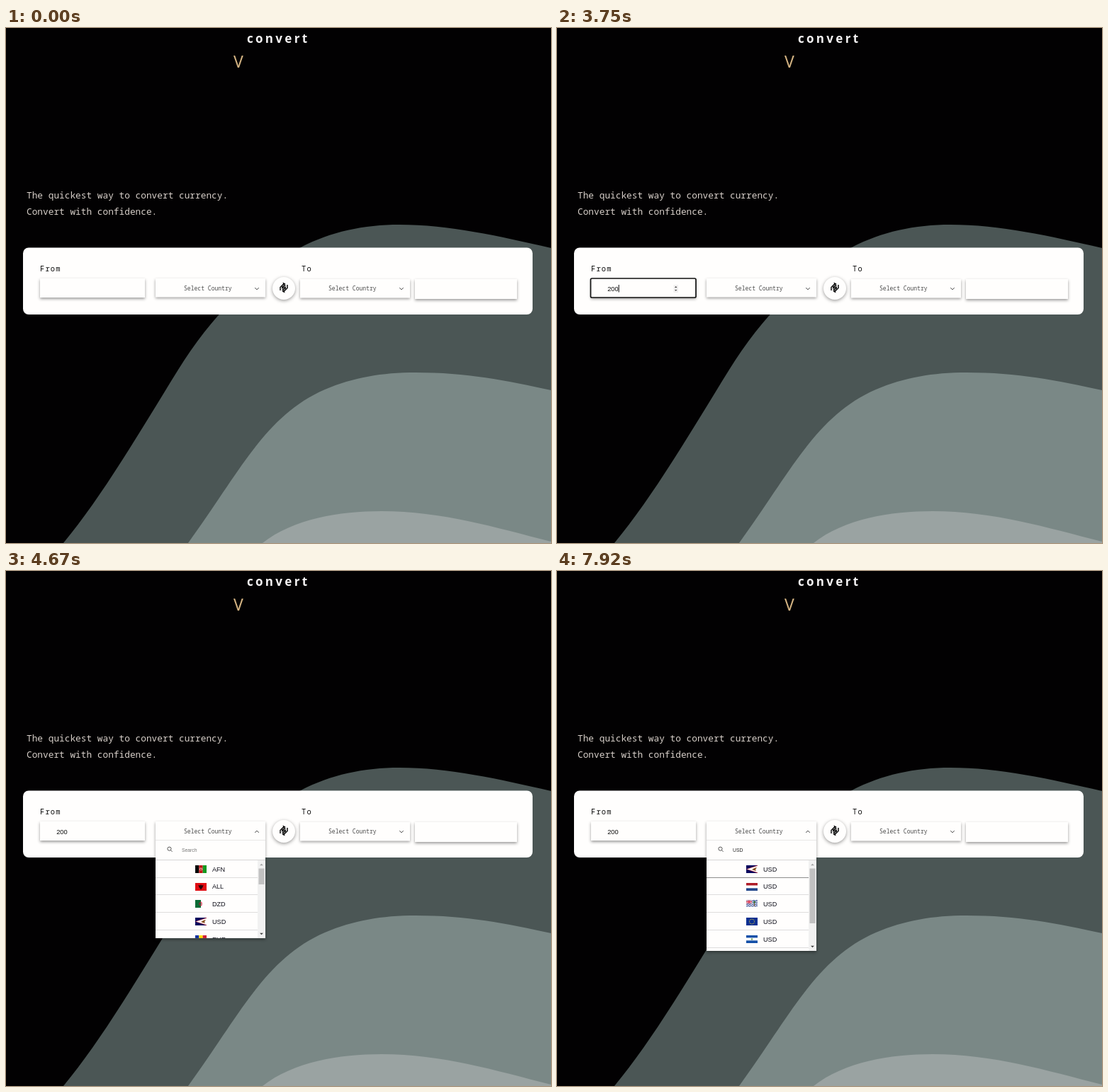
Write an HTML page with a canvas that moves like this. It is 769x728 px and loops after 8 s.

```html
<!DOCTYPE html>
<html lang="en">
<head>
<meta charset="utf-8">
<title>convert</title>
<style>
  html, body { margin: 0; width: 100%; height: 100%; overflow: hidden; background: #020102; }
  canvas { display: block; }
</style>
</head>
<body>
<canvas id="stage" width="769" height="728"></canvas>
<script>
const ctx = document.getElementById('stage').getContext('2d');
const LOOP = 8000;
const MONO = '"Noto Sans Mono", "DejaVu Sans Mono", monospace';
const SANS = '"Liberation Sans", Arial, sans-serif';
const HEAD = '"Noto Sans", "Open Sans", sans-serif';
const INK = '#0c0c0c', PAPER = '#fffefd';
const ROW = 24.8, LIST_TOP = 409, LIST_HEIGHT = 128;

function text(str, x, y, font, color, spacing = 0) {
  ctx.font = font;
  ctx.letterSpacing = spacing + 'px';
  ctx.fillStyle = color;
  ctx.fillText(str, x, y);
  const width = ctx.measureText(str).width;
  ctx.letterSpacing = '0px';
  return width;
}

function rect(x, y, w, h, color) {
  ctx.fillStyle = color;
  ctx.fillRect(x, y, w, h);
}

function disc(x, y, r, color) {
  ctx.fillStyle = color;
  ctx.beginPath();
  ctx.arc(x, y, r, 0, Math.PI * 2);
  ctx.fill();
}

function poly(points, color) {
  ctx.fillStyle = color;
  ctx.beginPath();
  points.forEach(([x, y]) => ctx.lineTo(x, y));
  ctx.fill();
}

function line(points, color, width) {
  ctx.strokeStyle = color;
  ctx.lineWidth = width;
  ctx.beginPath();
  points.forEach(([x, y]) => ctx.lineTo(x, y));
  ctx.stroke();
}

function raised(draw, blur = 4) {
  ctx.save();
  ctx.shadowColor = 'rgba(0,0,0,.4)';
  ctx.shadowBlur = blur;
  ctx.shadowOffsetY = 1.5;
  draw();
  ctx.restore();
}

const box = (x, y, w, h) => raised(() => rect(x, y, w, h, PAPER));

function triangle(x, y, w, dir, color) {
  poly([[x - w, y + dir * w / 2], [x + w, y + dir * w / 2], [x, y - dir * w / 2]], color);
}

function wave(path, color) {
  ctx.fillStyle = color;
  ctx.fill(new Path2D(path));
}

function chevron(x, y, dir) {
  line([[x - 2.7, y + dir * 1.4], [x, y - dir * 1.4], [x + 2.7, y + dir * 1.4]], '#444', 1);
}

// Flags are drawn in a 16 x 11 cell.
const columns = (...colors) => colors.forEach((c, i, a) => rect(i * 16 / a.length, 0, 16 / a.length, 11, c));
const bands = (...colors) => colors.forEach((c, i, a) => rect(0, i * 11 / a.length, 16, 11 / a.length, c));

function unionCanton(w, h) {
  for (const [color, cross, diagonal] of [['#fff', 2.4, 1.4], ['#d4213d', 1.2, 0.5]]) {
    line([[0, 0], [w, h]], color, diagonal);
    line([[0, h], [w, 0]], color, diagonal);
    line([[w / 2, 0], [w / 2, h]], color, cross);
    line([[0, h / 2], [w, h / 2]], color, cross);
  }
}

const flags = {
  afghan() {
    columns('#080808', '#c01818', '#129a20');
    disc(8, 5.5, 2.1, '#e8a5a0');
    disc(8, 5.7, 1, '#c01818');
  },
  albania() {
    bands('#e00b12');
    poly([[8, 2], [9, 3.4], [11.6, 3], [10.4, 6.2], [8, 9.5], [5.6, 6.2], [4.4, 3], [7, 3.4]], '#260308');
  },
  algeria() {
    columns('#0a6b35', '#fff');
    ctx.strokeStyle = '#d21034';
    ctx.lineWidth = 1;
    ctx.beginPath();
    ctx.arc(8, 5.5, 2.3, 0.8, 5.5);
    ctx.stroke();
    disc(9, 5.5, 0.9, '#d21034');
  },
  samoa() {
    bands('#08085e');
    poly([[0, 5.5], [16, 0], [16, 11]], '#c8232c');
    poly([[1, 5.5], [16, 0.8], [16, 10.2]], '#fff');
    poly([[8, 6], [12, 3.7], [15, 3], [13, 6], [14, 8], [10.5, 7]], '#8a5120');
  },
  andorra() {
    columns('#1433a0', '#fedd00', '#d02038');
    disc(8, 5.5, 1.8, '#c78c35');
  },
  australia() {
    bands('#08147a');
    unionCanton(8, 5.5);
    for (const [x, y] of [[4, 8.4], [12, 2], [10.3, 5], [13.8, 4.4], [12, 8.8]]) disc(x, y, 0.8, '#fff');
  },
  austria: () => bands('#c8203c', '#fff', '#c8203c'),
  belgium: () => columns('#080808', '#fddc16', '#d8203a'),
  netherlands: () => bands('#ae1c28', '#fff', '#21468b'),
  ocean() {
    bands('#fff');
    for (let y = 1; y < 11; y += 2.5) {
      ctx.strokeStyle = '#304a94';
      ctx.lineWidth = 1.1;
      ctx.beginPath();
      for (let x = 0; x <= 16; x += 0.5) ctx.lineTo(x, y + 0.5 * Math.sin(x * 1.6));
      ctx.stroke();
    }
    rect(0, 0, 8, 5.5, '#20307c');
    unionCanton(8, 5.5);
    line([[11.5, 3], [11.5, 9]], '#7a5130', 1);
    disc(11.5, 3, 1.5, '#35703c');
  },
  stars() {
    bands('#0a2f92');
    for (let i = 0; i < 12; i++) {
      const a = i * Math.PI / 6;
      disc(8 + 3.5 * Math.cos(a), 5.5 + 3.5 * Math.sin(a), 0.55, '#f5d331');
    }
  },
  salvador() {
    bands('#1450a8', '#fff', '#1450a8');
    disc(8, 5.5, 1.3, '#75a563');
  }
};

const LISTS = {
  all: [['afghan', 'AFN'], ['albania', 'ALL'], ['algeria', 'DZD'], ['samoa', 'USD'], ['andorra', 'EUR']],
  u: [['samoa', 'USD'], ['andorra', 'EUR'], ['australia', 'AUD'], ['austria', 'EUR'], ['belgium', 'EUR']],
  us: ['samoa', 'netherlands', 'ocean', 'stars', 'salvador'].map(flag => [flag, 'USD'])
};

function flag(name, x, y) {
  ctx.save();
  ctx.translate(x, y);
  ctx.beginPath();
  ctx.rect(0, 0, 16, 11);
  ctx.clip();
  flags[name]();
  ctx.restore();
}

function backdrop() {
  rect(0, 0, 769, 728, '#020102');
  wave('M81 728C136 662 191 567 243 483C288 410 352 343 416 310C458 288 505 278 555 278C625 278 695 294 769 311V728Z', '#4b5655');
  wave('M257 728C330 628 365 548 450 511C490 494 530 487 578 487C650 487 705 498 769 512V728Z', '#7a8886');
  wave('M362 728C405 694 470 683 530 683C615 683 690 706 769 726V728Z', '#9aa3a2');
  text('convert', 340, 21, `600 17px ${HEAD}`, '#f4f2f3', 3.3);
  text('V', 321, 56, `500 23px ${HEAD}`, '#d5b483');
  text('The quickest way to convert currency.', 29, 240.5, `300 12.8px ${MONO}`, '#d8d0ca');
  text('Convert with confidence.', 29, 264, `300 12.8px ${MONO}`, '#d8d0ca');
}

function swapButton() {
  raised(() => disc(392, 368, 16, PAPER), 5);
  ctx.save();
  ctx.translate(392, 367);
  for (let i = 0; i < 2; i++) {
    line([[-5, 4], [-5, -0.5], [-0.5, -5]], INK, 1.5);
    poly([[-1.5, -7.5], [2.5, -5.5], [-0.3, -2.5]], INK);
    line([[0, 0], [-2.2, 0.8], [-2.2, -1.2], [0.5, -2.2], [2.4, -3.8]], INK, 1.5);
    ctx.rotate(Math.PI);
  }
  ctx.restore();
}

function select(x, y, open) {
  box(x, y, 155, 26.5);
  text('Select Country', x + 40, 371.3, `8.05px ${MONO}`, '#4a4a4a');
  chevron(x + 143, 368.5, open ? 1 : -1);
}

function card() {
  ctx.fillStyle = PAPER;
  ctx.beginPath();
  ctx.roundRect(24, 310.5, 719, 94.5, 8);
  ctx.fill();
  text('From', 48, 344, `500 10.4px ${MONO}`, INK, 1.2);
  text('To', 417, 344, `500 10.4px ${MONO}`, INK, 1.2);
  box(48, 354, 148, 27);
  select(415, 355, false);
  box(577, 355, 144, 28);
  swapButton();
}

function amountField(t) {
  const value = t < 1750 ? '' : t < 2420 ? '2' : t < 2580 ? '20' : '200';
  const focused = t >= 1330 && t < 4080;
  const caretOff = (t >= 2330 && t < 2420) || (t >= 3170 && t < 3750);
  const width = text(value, 71.2, 371.5, `9.3px ${SANS}`, INK);
  if (!focused) return;
  ctx.strokeStyle = '#111';
  ctx.lineWidth = 1.7;
  ctx.beginPath();
  ctx.roundRect(47.5, 354, 148.5, 27, 1.8);
  ctx.stroke();
  rect(164.5, 363, 6.5, 11, '#f1f0f0');
  triangle(167.7, 366, 1.8, 1, '#444');
  triangle(167.7, 370.8, 1.8, -1, '#444');
  if (!caretOff) rect(71.2 + width, 363, 1, 10.5, INK);
}

function searchField(t) {
  const query = t < 6330 ? '' : t < 6750 ? 'U' : t < 7250 ? 'US' : 'USD';
  const caretOn = t >= 5500 && t < 7830 && !(t >= 6080 && t < 6330);
  ctx.strokeStyle = '#444';
  ctx.lineWidth = 0.9;
  ctx.beginPath();
  ctx.arc(230.5, 392.7, 2.6, 0, Math.PI * 2);
  ctx.stroke();
  line([[232.4, 394.6], [234.6, 396.8]], '#444', 0.9);
  const font = `6.8px ${SANS}`;
  const width = query ? text(query, 248, 397.3, font, '#222') : 0;
  if (!query) text('Search', 248, 397.3, font, '#777');
  if (caretOn) rect(247.9 + width, 391, 0.9, 8, INK);
}

function scrollbar(bottom, thumb) {
  rect(355, LIST_TOP, 11, bottom - LIST_TOP, '#f1f1f1');
  rect(356.5, 420.5, 8, thumb, '#c1c1c1');
  triangle(360.5, 415, 2.4, 1, '#a3a3a3');
  triangle(360.5, bottom - 6, 2.4, -1, '#404040');
}

function dropdown(t) {
  const tick = Math.floor((t + 5) * 0.012) / 0.012;
  const grown = Math.min(1, Math.max(0, (tick - 4155) / 595));
  const bottom = LIST_TOP + LIST_HEIGHT * grown;
  const rows = t < 6330 ? LISTS.all : t < 6750 ? LISTS.u : LISTS.us;

  box(211, 354, 155, bottom - 354);
  ctx.save();
  ctx.beginPath();
  ctx.rect(211, 354, 155, bottom - 354);
  ctx.clip();
  select(211, 354, true);
  rect(211, 380.5, 155, bottom - 380.5, PAPER);
  rect(211, 380, 155, 1, '#e8e7e7');
  searchField(t);
  rect(211, 408, 155, 1, '#d6d5d5');
  rows.forEach(([name, code], i) => {
    const y = 421.3 + i * ROW;
    flag(name, 267, Math.round(y - 5.5));
    text(code, 291, Math.round(y + 3.3), `9.1px ${SANS}`, '#0d0d18');
    const hovered = i === 0 && t >= 7920;
    rect(211, Math.round(y + 11.2), 144, 1, hovered ? '#8d8d8d' : '#dedddd');
  });
  scrollbar(bottom, t < 6750 ? 22.5 : 77.5);
  ctx.restore();
}

function render(t) {
  backdrop();
  card();
  amountField(t);
  if (t < 4160) select(211, 354, false);
  else dropdown(t);
}

const start = performance.now();
function loop() {
  render((performance.now() - start) % LOOP);
  requestAnimationFrame(loop);
}
loop();
</script>
</body>
</html>
```
